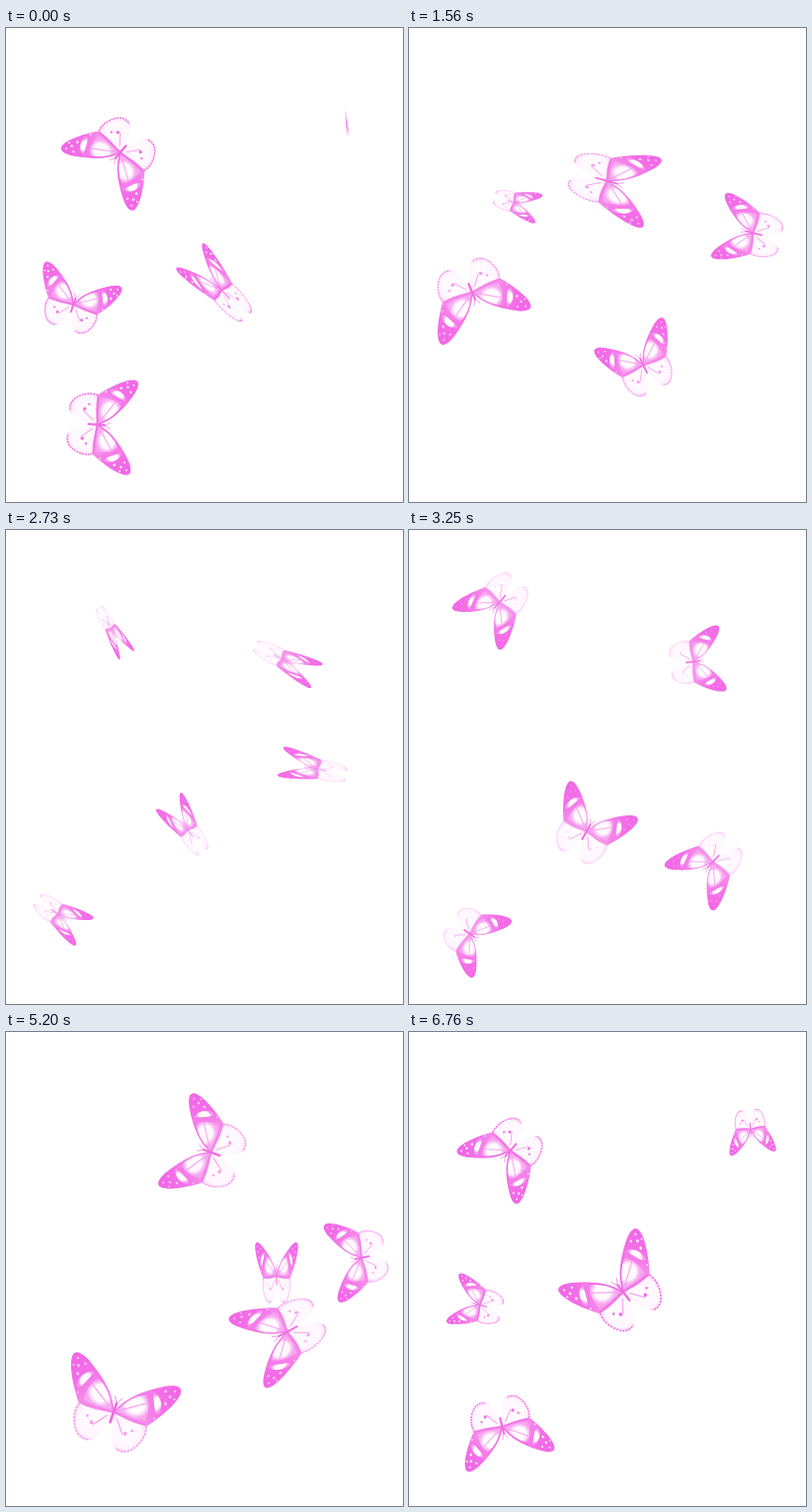
An HTML page for the animation above (6.89 s loop, 402 px wide and 480 px high).

```html
<!DOCTYPE html>
<html lang="en">
<head>
<meta charset="utf-8">
<title>Pink butterflies</title>
<style>
  html, body { margin: 0; width: 100%; height: 100%; overflow: hidden; background: #fff; }
  svg { display: block; width: 100vw; height: 100vh; }
</style>
</head>
<body>
<svg id="stage" viewBox="0 0 402 480">
  <defs>
    <linearGradient id="fore" gradientUnits="userSpaceOnUse" x1="0" y1="0" x2="52" y2="-34">
      <stop offset="0" stop-color="#f49cec"/>
      <stop offset=".45" stop-color="#f58bea"/>
      <stop offset=".75" stop-color="#f46fe8"/>
      <stop offset="1" stop-color="#f268e6"/>
    </linearGradient>
    <radialGradient id="hind" gradientUnits="userSpaceOnUse" cx="17" cy="18" r="27">
      <stop offset="0" stop-color="#fffdff"/>
      <stop offset=".6" stop-color="#fff6fe"/>
      <stop offset="1" stop-color="#fbc3f5"/>
    </radialGradient>
    <radialGradient id="cell">
      <stop offset="0" stop-color="#fff"/>
      <stop offset=".65" stop-color="#fff8fe"/>
      <stop offset="1" stop-color="#fccdf7" stop-opacity=".4"/>
    </radialGradient>
    <g id="wing">
      <path fill="url(#hind)" d="M0 3C10 2 26 0 36 5C40 14 37 24 32 30C28 38 20 41 14 38C8 35 4 24 0 8Z"/>
      <path fill="url(#fore)" d="M0 3C5-12 18-25 38-37C46-42 57-46 58-38C59-28 47-8 37 5C28 8 8 6 0 3Z"/>
      <path fill="url(#cell)" d="M3 0C8-12 14-19 25-24C32-20 34-6 33 1C23 3 12 3 3 0Z"/>
      <path fill="url(#cell)" d="M31-29C38-30 47-19 44-10C40-6 37-17 31-29Z"/>
      <path fill="none" stroke="#f7a5ef" stroke-width="1.3" d="M1 4Q20 4 36 5M3 1L30-17M5 8L16 22"/>
      <g class="detail">
        <path fill="none" stroke="#f36be6" stroke-width="1.7" d="M1 3Q18 5 36 5M1 1Q10-17 27-27"/>
        <path fill="none" stroke="#f36be6" stroke-width="1.8" stroke-dasharray="2.2 1.3" d="M36 6C39 14 36 24 32 30C28 37 20 40 14 37"/>
        <g fill="#f36be6"><circle cx="18" cy="20" r="2"/><circle cx="24" cy="15" r="1.4"/></g>
        <g fill="#fff">
          <circle cx="52" cy="-37" r="1.2"/><circle cx="49" cy="-30" r="1.5"/>
          <circle cx="54" cy="-29" r="1.1"/><circle cx="47" cy="-22" r="1.6"/>
          <circle cx="43" cy="-34" r="1.3"/><circle cx="41" cy="-4" r="1"/>
        </g>
      </g>
    </g>
    <g id="butterfly">
      <use href="#wing"/>
      <use href="#wing" transform="scale(-1 1)"/>
      <path fill="none" stroke="#f06ae3" stroke-width="2.6" stroke-linecap="round" d="M0-6V14"/>
      <path fill="none" stroke="#f06ae3" stroke-width=".7" d="M0-6L-4-13M0-6L4-13"/>
    </g>
  </defs>
</svg>
<script>
const LOOP = 6890, STEP = 130;
const times = [0, 1040, 2080, 3250, 4160, 5200, 6760, LOOP];
const stage = document.getElementById('stage');
const detail = document.querySelector('.detail');
const flies = [];

// Each pose: x, y, heading in degrees, size, wing opening.
function addFly(...poses) {
  const node = document.createElementNS('http://www.w3.org/2000/svg', 'use');
  node.setAttribute('href', '#butterfly');
  stage.append(node);
  flies.push({ node, poses });
}

addFly([114, 128, 131, .82, 1.03], [142, 168, 323, 1, .8], [264, 138, 68, 1.1, .42],
  [290, 133, 353, .66, .88], [336, 154, 28, .8, .48], [358, 229, 169, .7, 1], [346, 100, 84, .55, .74]);
addFly([345, 96, 84, .3, .06], [367, 264, 121, .72, .72], [321, 152, 265, .88, .75],
  [306, 338, 133, .8, .75], [270, 455, 315, .75, .85], [282, 305, 152, 1.02, .7], [215, 261, 232, .96, .92]);
addFly([69, 278, 289, .72, 1], [58, 210, 103, .85, 1.05], [72, 345, 32, .83, 1],
  [63, 410, 35, .62, 1], [236, 402, 178, .97, .43], [110, 382, 289, 1, 1], [95, 402, 76, .8, 1]);
addFly([216, 263, 227, 1.04, .33], [88, 190, 60, .6, .6], [138, 163, 330, .55, .33],
  [90, 75, 131, .8, .72], [172, 207, 17, .7, .6], [274, 245, 270, .75, .5], [70, 276, 195, .63, .72]);
addFly([95, 402, 5, .83, 1], [248, 390, 332, .87, .88], [203, 292, 157, .7, .85],
  [181, 303, 299, .82, .85], [247, 187, 263, .94, .7], [205, 121, 200, .87, 1], [101, 122, 131, .82, .87]);

// At the loop point every butterfly takes over the place of another.
const heirs = [1, 3, 4, 2, 0];
const starts = flies.map(f => f.poses[0]);
flies.forEach((f, i) => f.poses.push(starts[heirs[i]]));

const mix = (a, b, u) => a + (b - a) * u;
const turn = (a, b) => ((b - a + 540) % 360) - 180;

function slope(poses, i, axis) {
  const a = Math.max(0, i - 1), b = Math.min(times.length - 1, i + 1);
  return (poses[b][axis] - poses[a][axis]) / (times[b] - times[a]);
}

function glide(poses, i, axis, u) {
  const span = times[i + 1] - times[i], v = 1 - u;
  return poses[i][axis] * v * v * (1 + 2 * u) + poses[i + 1][axis] * u * u * (3 - 2 * u)
    + span * u * v * (v * slope(poses, i, axis) - u * slope(poses, i + 1, axis));
}

function draw(t) {
  let i = 0;
  while (t >= times[i + 1]) i++;
  const span = times[i + 1] - times[i];
  const u = (t - times[i]) / span;
  const beats = Math.round(span / 420);
  const flap = .62 + .38 * Math.cos(2 * Math.PI * beats * u);

  for (const { node, poses } of flies) {
    const a = poses[i], b = poses[i + 1];
    const x = glide(poses, i, 0, u), y = glide(poses, i, 1, u);
    const angle = a[2] + turn(a[2], b[2]) * u + 90;
    const size = mix(a[3], b[3], u);
    const open = mix(a[4], b[4], u) * flap;
    node.setAttribute('transform',
      `translate(${x.toFixed(2)} ${y.toFixed(2)}) rotate(${angle.toFixed(2)}) scale(${(size * open).toFixed(4)} ${size.toFixed(4)})`);
  }
  detail.setAttribute('opacity', (.6 + .4 * Math.cos(2 * Math.PI * t / LOOP)).toFixed(3));
}

function tick(now) {
  draw(Math.floor((now % LOOP) / STEP) * STEP);
  requestAnimationFrame(tick);
}
draw(0);
requestAnimationFrame(tick);
</script>
</body>
</html>
```
